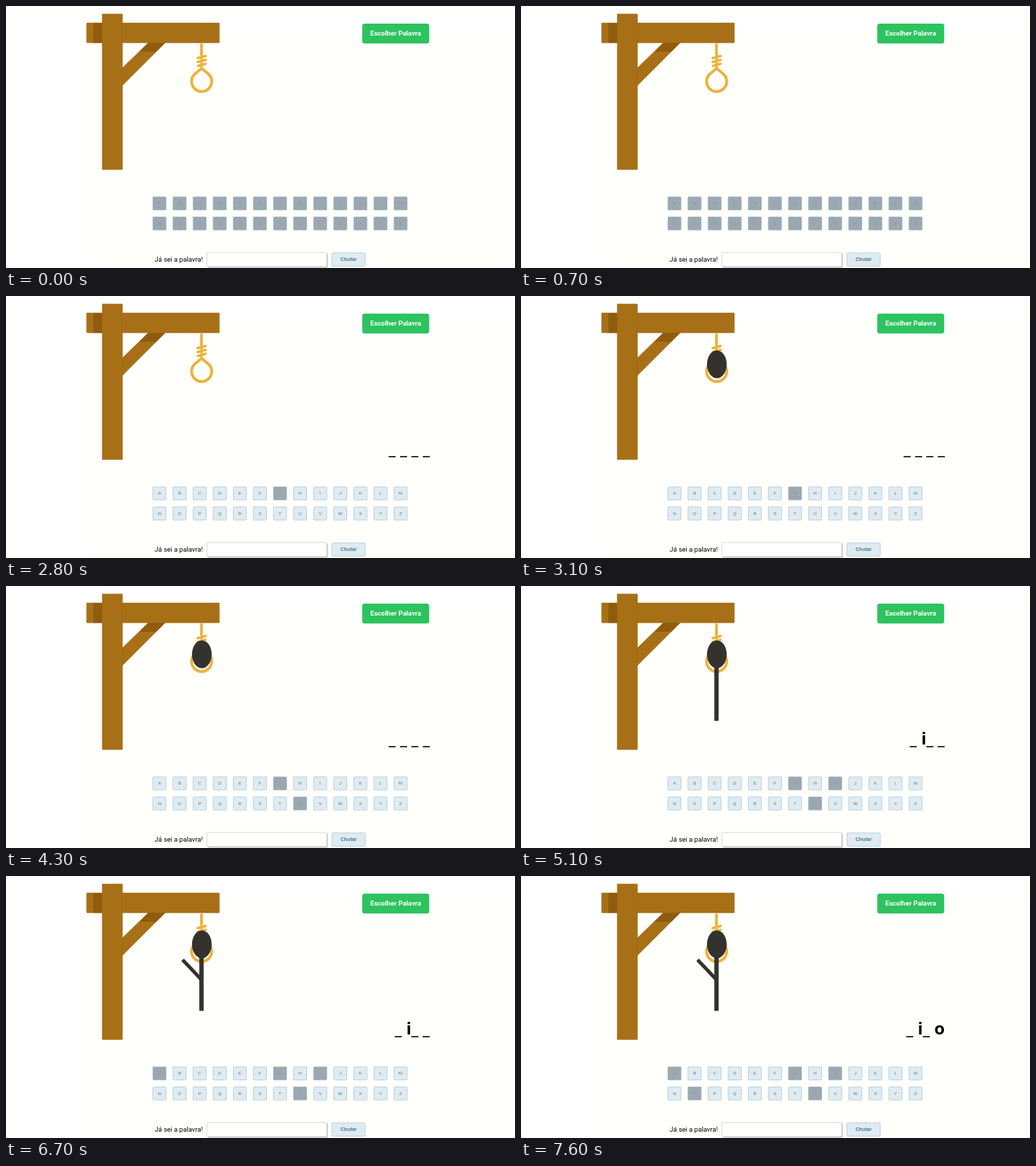
Animation, 722 px wide and 372 px high, one loop 8000 ms. Source, as an HTML page:

```html
<!DOCTYPE html>
<html lang="pt">
<head>
<meta charset="utf-8">
<title>Jogo da forca</title>
<style>
  html, body { margin: 0; width: 100%; height: 100%; overflow: hidden; background: #fff; }
  svg { display: block; }
  text { font-family: Roboto, sans-serif; }
  .wood { fill: #a87016; stroke: #9a6510; stroke-width: .5; }
  .shade { fill: #8f5b0d; }
  .rope { fill: none; stroke: #ecb23c; stroke-width: 4; stroke-linecap: round; stroke-linejoin: round; }
  .limb { stroke: #33322f; fill: none; }
  .key rect, .guess rect { fill: #e0ebf0; stroke: #a9c8da; stroke-width: .8; }
  .key text, .guess text { fill: #44799d; text-anchor: middle; font-family: "Liberation Sans", Arial, sans-serif; }
  .key text { font-size: 6.2px; }
  .guess text { font-size: 7.2px; font-weight: 700; }
  .key.off rect { fill: #9ba8b2; stroke: #9fb2bf; }
  .key.off text { fill: #8496a4; }
  #word { text-anchor: end; font: 700 24px "Open Sans", sans-serif; }
  #word.plain { font: 400 24px "Liberation Sans", Arial, sans-serif; }
</style>
</head>
<body>
<svg width="722" height="372" viewBox="0 0 722 372">
  <defs>
    <filter id="drop" x="-5%" y="-20%" width="110%" height="150%">
      <feDropShadow dx="1" dy="1" stdDeviation=".7" flood-color="#000" flood-opacity=".35"/>
    </filter>
  </defs>
  <rect x="116" y="32" width="606" height="340" fill="#fffffc"/>

  <g id="gallows">
    <path class="wood" d="M165 88 L203 51 H227 L165 113 Z"/>
    <path class="shade" d="M189.500 65 L203 51 H227 L213 65 Z"/>
    <rect class="wood" x="114.300" y="24" width="188.400" height="28.300" rx="1"/>
    <rect class="shade" x="124" y="24" width="13" height="28.300"/>
    <rect class="wood" x="136.500" y="11.300" width="28.700" height="221" rx=".5"/>
  </g>

  <g class="rope">
    <path d="M277.300 54.500 V70" stroke-linecap="butt"/>
    <path d="M277.500 88.500 L267.400 97 A14.300 14.300 0 1 0 287.600 97 Z"/>
    <path d="M272 74 L283 71 M272 79.500 L283 76.500 M272.500 85 L283 82" stroke-width="3.600"/>
    <path d="M277.300 52.500 V90" stroke-width="3" stroke-linecap="butt"/>
  </g>

  <path id="body" class="limb" d="M277.300 112 V191.500" stroke-width="6.200"/>
  <path id="arm" class="limb" d="M250.500 119 L277 147" stroke-width="5"/>
  <ellipse id="head" cx="277.800" cy="97" rx="14" ry="19.800" fill="#33322f"/>

  <rect x="505.300" y="25" width="95" height="28.200" rx="3.500" fill="#2dc35e"/>
  <text x="552.800" y="41.600" font-size="9.600" font-weight="700" fill="#fff" text-anchor="middle">Escolher Palavra</text>

  <text id="word" x="601"></text>
  <g id="keys"></g>

  <text x="210.800" y="363" font-size="9.550">Já sei a palavra!</text>
  <rect x="285" y="350" width="170" height="20" rx="1.500" fill="#fffffd" stroke="#c4c4c4" stroke-width=".7" filter="url(#drop)"/>
  <g class="guess">
    <rect x="462.400" y="350.600" width="47.200" height="18.800" rx="1.500"/>
    <text x="486" y="362.300">Chutar</text>
  </g>
</svg>
<script>
  const LOOP = 8000;
  const START = 1300;
  const FONT_READY = 1400;
  const pressed = { G: 2800, U: 4300, I: 5100, A: 6500, O: 7600 };
  const parts = { head: 3000, body: 4500, arm: 6700 };
  const words = [[0, ""], [START, "_ _ _ _"], [5100, "_ i_ _"], [7600, "_ i_ o"]];

  const byId = id => document.getElementById(id);
  const word = byId("word");

  function addKey(letter, i) {
    const x = 208.4 + 28.5 * (i % 13);
    const y = i < 13 ? 271 : 299.5;
    const key = document.createElementNS("http://www.w3.org/2000/svg", "g");
    key.setAttribute("class", "key");
    key.innerHTML = `<rect x="${x}" y="${y}" width="18.6" height="18.6" rx="1"/>
      <text x="${x + 9.3}" y="${y + 11.4}">${letter}</text>`;
    byId("keys").append(key);
    return { letter, key };
  }
  const keys = [..."ABCDEFGHIJKLMNOPQRSTUVWXYZ"].map(addKey);

  function draw(t) {
    for (const { letter, key } of keys) {
      key.classList.toggle("off", t < START || t >= pressed[letter]);
    }
    for (const id in parts) {
      byId(id).style.visibility = t >= parts[id] ? "visible" : "hidden";
    }
    const plain = t < FONT_READY;
    word.textContent = words.findLast(([at]) => t >= at)[1];
    word.classList.toggle("plain", plain);
    word.setAttribute("y", plain ? 223 : 225.2);
  }

  const origin = performance.now();
  function tick() {
    draw((performance.now() - origin) % LOOP);
    requestAnimationFrame(tick);
  }
  tick();
</script>
</body>
</html>
```
